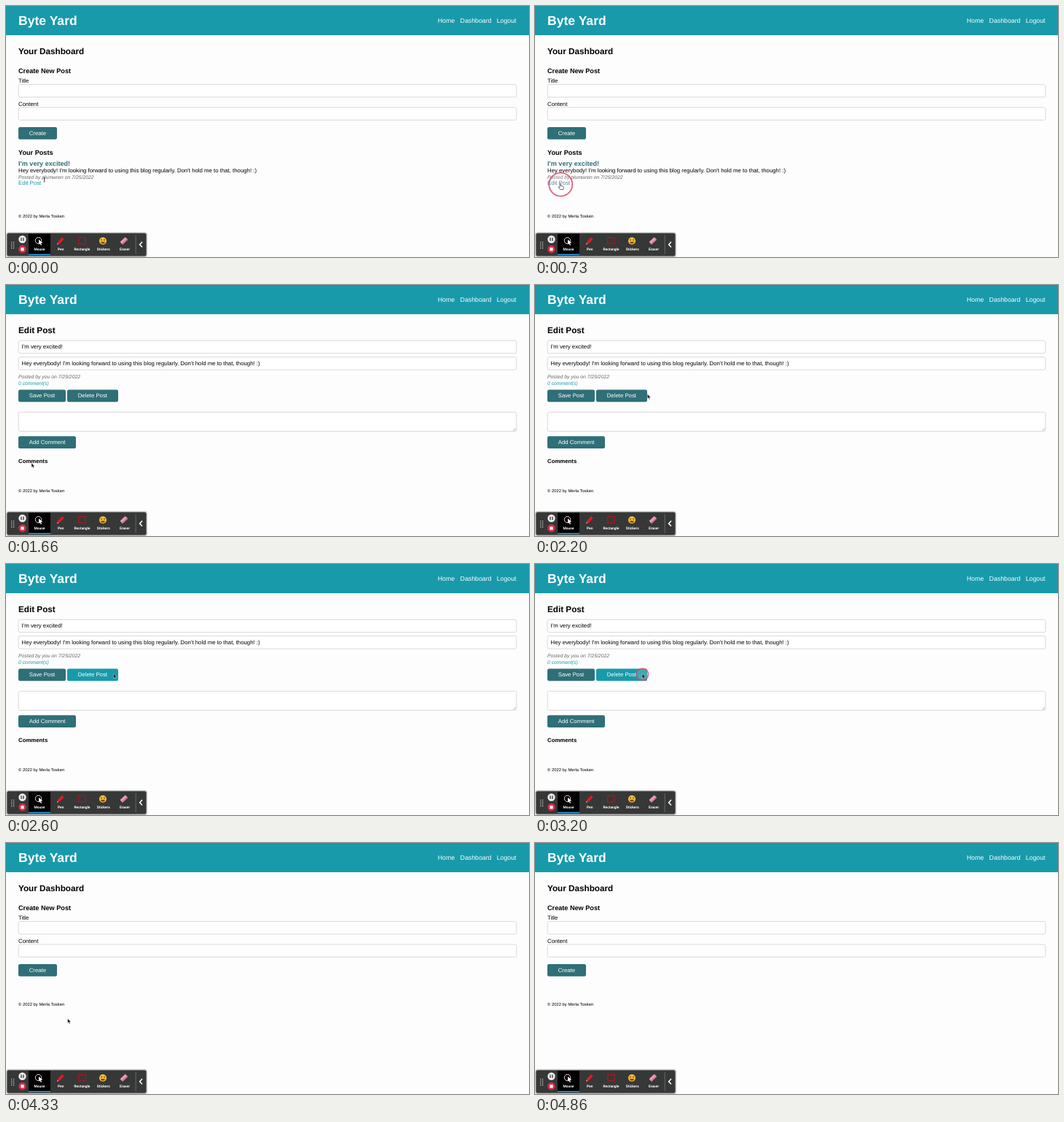
Animation of 718x344 px, one loop 6.4 s. Source, as an HTML page:

```html
<!DOCTYPE html>
<html lang="en">
<head>
<meta charset="utf-8">
<title>Dashboard demo</title>
<style>
  html, body { margin: 0; width: 100%; height: 100%; overflow: hidden; background: #fdfdfd; }
  svg { display: block; width: 718px; height: 344px; }
  text { font-family: "Liberation Sans", Arial, sans-serif; font-size: 7.81px; text-rendering: geometricPrecision; white-space: pre; }
  .h1 { font-size: 17.57px; font-weight: bold; fill: #fff; }
  .h2 { font-size: 11.71px; font-weight: bold; }
  .h3 { font-size: 9.14px; font-weight: bold; }
  .bold { font-weight: bold; }
  .nav { font-size: 8.78px; fill: #fff; }
  .meta { font-size: 6.84px; font-style: italic; fill: #666; }
  .foot { font-size: 5.86px; }
  .link { fill: #189aab; }
  .dark { fill: #2f6f77; }
  .label { fill: #fff; }
  .field { fill: #fff; stroke: #d0d0d0; stroke-width: .8; }
  .tool { font: bold 4.9px Roboto, sans-serif; fill: #fff; text-anchor: middle; }
</style>
</head>
<body>
<svg viewBox="0 0 718 344" xmlns="http://www.w3.org/2000/svg">
  <defs>
    <filter id="soft" x="-5%" y="-20%" width="110%" height="140%"><feGaussianBlur stdDeviation="1.2"/></filter>
  </defs>
  <rect width="718" height="344" fill="#fdfdfd"/>
  <rect width="718" height="40" fill="#189aab"/>
  <g id="header"></g>
  <g id="dashboard"></g>
  <g id="post"></g>
  <g id="editor"></g>
  <g id="footer"></g>

  <g id="toolbar">
    <rect x="1" y="311" width="192" height="32.5" rx="2" fill="#000" opacity=".55" filter="url(#soft)"/>
    <rect x="1.5" y="311.5" width="191" height="31" rx="2" fill="#363837"/>
    <rect x="31" y="312" width="30" height="29" fill="#000"/>
    <rect x="31" y="339.8" width="30" height="1.5" fill="#1d9bf0"/>
    <g id="grip" fill="#ddd"></g>
    <circle cx="22.5" cy="319.8" r="5.2" fill="#eee"/>
    <path d="M21 317.5v4.6M24 317.5v4.6" stroke="#333" stroke-width="1.3"/>
    <circle cx="22.5" cy="333.3" r="5.2" fill="#d92c4c"/>
    <rect x="20.4" y="331.2" width="4.2" height="4.2" rx=".5" fill="#fff"/>
    <circle cx="44.5" cy="321.5" r="4.2" fill="none" stroke="#f3cdd3"/>
    <path d="M45 320l5.2 4.7-2.4.2 1.3 2.6-1.3.6-1.2-2.7-1.6 1.5z" fill="#fff"/>
    <path d="M70.3 326.8l1.1-3.7 5.6-6 2.7 2.5-5.7 6z" fill="#e01b24"/>
    <path d="M70.3 326.8l.5-1.7 1.3 1.2z" fill="#fff"/>
    <rect x="99.8" y="317.5" width="9.4" height="8.4" fill="none" stroke="#b3151d" stroke-width="1.2"/>
    <circle cx="133" cy="322" r="5" fill="#f7bd34"/>
    <path d="M130 323.2h6q-.5 2.5-3 2.5t-3-2.5z" fill="#7a3b12"/>
    <path d="M130.3 320.7h1.6M134.2 320.7h1.6" stroke="#4b2b12" stroke-width="1.2"/>
    <g transform="rotate(-42 162 322)">
      <rect x="157" y="319.3" width="10" height="5" rx="1" fill="#ed9bb2"/>
      <rect x="157" y="322.6" width="10" height="1.7" rx=".6" fill="#c96f8b"/>
    </g>
    <path d="M178.2 314v26" stroke="#777" stroke-width=".8"/>
    <path d="M187 323.2l-3.4 3.7 3.4 3.7" fill="none" stroke="#fff" stroke-width="1.5"/>
  </g>

  <circle id="ring" stroke="#dc4f6a" stroke-width="1.9" fill="#fff" fill-opacity=".22"/>
  <g id="cursor">
    <path id="beam" d="M-1.3-3q1.3 0 1.3 1v4q0 1-1.3 1M1.3-3q-1.3 0-1.3 1v4q0 1 1.3 1" fill="none" stroke="#444" stroke-width=".7"/>
    <path id="hand" d="M-.8 0q.8-.9 1.5 0v2.4l3 .8q.8.4.6 1.5l-.7 2.8H-.6l-2.2-3.2q.2-1.2 2 .2z" fill="#fff" stroke="#333" stroke-width=".7" stroke-linejoin="round"/>
    <path id="arrow" d="M0 0v6l1.4-1.2 1 2.3 1.1-.5-1-2.2h2z" fill="#111" stroke="#fff" stroke-width=".4"/>
  </g>
</svg>
<script>
const LOOP = 6400, FRAME = 1000 / 15;
const $ = id => document.getElementById(id);

function add(parent, tag, attrs, content = "") {
  const node = document.createElementNS("http://www.w3.org/2000/svg", tag);
  for (const key in attrs) node.setAttribute(key, attrs[key]);
  node.textContent = content;
  return $(parent).appendChild(node);
}
const write = (parent, content, x, y, cls = "") => add(parent, "text", { x, y, class: cls }, content);
const field = (parent, y, height) => add(parent, "rect", { x: 17.2, y, width: 683.6, height, rx: 2.2, class: "field" });

const buttons = [];
function button(parent, label, x, y, width) {
  const node = add(parent, "rect", { x, y, width, height: 16.8, rx: 2.2 });
  write(parent, label, x + 14.7, y + 10.9, "label");
  buttons.push({ node, parent, x, y, width });
}

write("header", "Byte Yard", 17, 26, "h1");
write("header", "Home", 592.7, 23, "nav");
write("header", "Dashboard", 623.6, 23, "nav");
write("header", "Logout", 673.7, 23, "nav");

const message = "Hey everybody! I'm looking forward to using this blog regularly. Don't hold me to that, though! :)";

write("dashboard", "Your Dashboard", 17, 65.6, "h2");
write("dashboard", "Create New Post", 17, 92.1, "h3");
write("dashboard", "Title", 17, 105.3);
field("dashboard", 107.6, 17.3);
write("dashboard", "Content", 17, 136.7);
field("dashboard", 139, 17.3);
button("dashboard", "Create", 17, 166, 53);

write("post", "Your Posts", 17, 203.8, "h3");
write("post", "I'm very excited!", 17, 218.6, "h3 dark");
write("post", message, 17, 227.9);
write("post", "Posted by plumwren on 7/25/2022", 17, 236.6, "meta");
const editLink = write("post", "Edit Post", 17, 245.4, "link");

write("editor", "Edit Post", 17, 65.6, "h2");
field("editor", 76.2, 17.4);
write("editor", "I'm very excited!", 21.6, 87.3);
field("editor", 98.7, 17.4);
write("editor", message, 21.6, 109.8);
write("editor", "Posted by you on 7/25/2022", 17, 128, "meta");
write("editor", "0 comment(s)", 17, 136.8, "meta").style.fill = "#189aab";
button("editor", "Save Post", 17, 143.5, 65);
button("editor", "Delete Post", 84, 143.5, 70);
field("editor", 174.3, 26.2);
add("editor", "path", { d: "M696.5 199.5l3.3-3.3M698.5 199.5l1.3-1.3", stroke: "#888", "stroke-width": .6 });
button("editor", "Add Comment", 17, 207.2, 79);
write("editor", "Comments", 17, 243.7, "bold");

const footer = write("footer", "© 2022 by Merla Tosken", 17, 290, "foot");

for (let i = 0; i < 8; i++)
  add("grip", "circle", { cx: 7.8 + (i % 2) * 2.8, cy: 323.6 + (i >> 1) * 2.7, r: .7 });
["Mouse", "Pen", "Rectangle", "Stickers", "Eraser"].forEach((name, i) =>
  write("toolbar", name, 46 + i * 29.25, 334.6, "tool"));

// Cursor path: step, x, y
const path = [
  [0, 52.7, 238], [8, 35, 244], [26, 35, 244], [33, 154.3, 149.6],
  [40, 147.2, 150.6], [58, 147.2, 150.6], [72, 22, 331]
];
const rings = [[3, .4], [8, .75], [16, .85]];
const clicks = [9, 47];

function locate(step) {
  const i = path.findIndex(p => p[0] > step);
  if (i < 0) return path[path.length - 1].slice(1);
  const [a, ax, ay] = path[i - 1], [b, bx, by] = path[i];
  const u = (step - a) / (b - a), k = u * u * (3 - 2 * u);
  return [ax + (bx - ax) * k, ay + (by - ay) * k];
}
const show = (node, on) => { node.style.display = on ? "" : "none"; };

function draw(time) {
  const step = Math.floor((time % LOOP + 8) / FRAME);
  const [x, y] = locate(step);
  const editing = step >= 16 && step < 58;
  const onLink = step < 16 && y > 239.5 && x < 49;

  show($("dashboard"), !editing);
  show($("post"), step < 16);
  show($("editor"), editing);
  footer.setAttribute("y", step < 16 ? 290 : editing ? 284.2 : 222.5);
  editLink.style.fill = onLink ? "#2f6f77" : "#189aab";

  for (const b of buttons) {
    const active = (b.parent === "editor") === editing;
    const over = active && x >= b.x && x < b.x + b.width && y >= b.y && y < b.y + 16.8;
    b.node.style.fill = over ? "#189aab" : "#2f6f77";
  }

  const kind = step >= 25 ? "arrow" : onLink || editing ? "hand" : "beam";
  for (const id of ["beam", "hand", "arrow"]) show($(id), id === kind);
  show($("cursor"), step < 73);
  $("cursor").setAttribute("transform", `translate(${x} ${y})`);

  const start = clicks.find(c => step >= c && step < c + rings.length);
  show($("ring"), start !== undefined);
  if (start !== undefined) {
    const [r, opacity] = rings[step - start];
    $("ring").setAttribute("r", r);
    $("ring").setAttribute("opacity", opacity);
    $("ring").setAttribute("cx", x + .3);
    $("ring").setAttribute("cy", y + .6);
  }
}

function tick() {
  draw(performance.now());
  requestAnimationFrame(tick);
}
tick();
</script>
</body>
</html>
```
